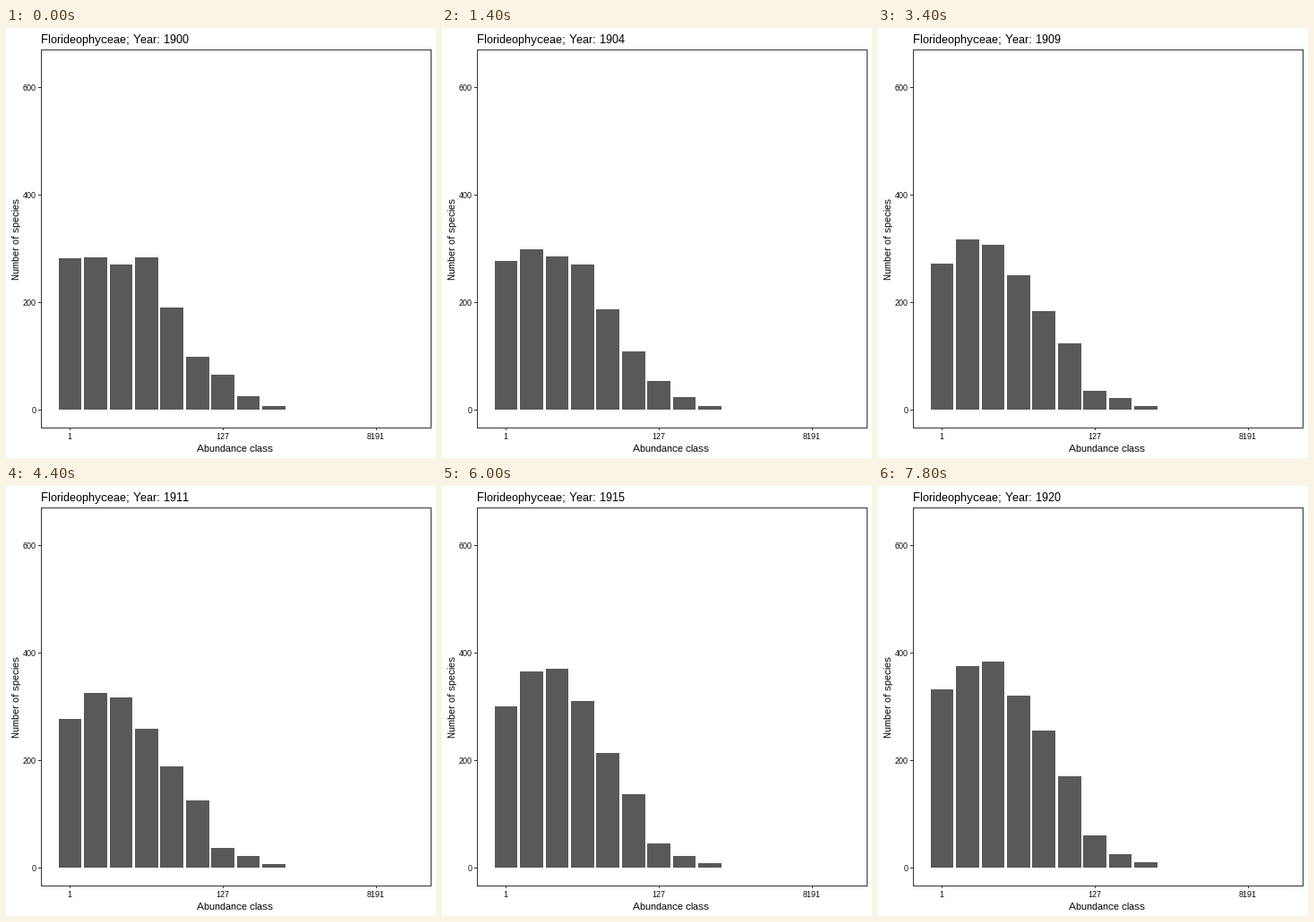
A matplotlib script for the animation above (8000 ms loop, 480 by 480 pixels).

```python
import numpy as np
import matplotlib.pyplot as plt
from matplotlib.animation import FuncAnimation
from matplotlib.patches import Rectangle

plt.rcParams.update({
    "font.family": ["Liberation Sans", "DejaVu Sans"],
    "text.hinting": "native",   # crisp, grid-fitted letters
    "text.hinting_factor": 1,
})

SIZE, DPI = 480, 80
FRAMES, STEP = 40, 200
YEARS_PER_FRAME = 50 / 99

BAR, LINE = "#595959", "#333333"
LEFT, RIGHT, TOP, BOTTOM = 39, 474, 24, 446
X0, PITCH, WIDTH = 58.65, 28.46, 25.6
ZERO, UNIT = 426.5, 0.6

# species per abundance class at the start, two turning points and the end
TURNS = [0, 17, 30, 39]
EASE = [1, 2, 1]
KEYS = np.array([
    [282, 285, 271, 284, 191, 99, 66, 26, 8],
    [273, 318, 308, 251, 184, 124, 36, 23, 8],
    [301, 366, 371, 311, 214, 138, 46, 23, 9],
    [333, 376, 384, 321, 256, 171, 61, 26, 11],
])

fig = plt.figure(figsize=(SIZE / DPI, SIZE / DPI), dpi=DPI, facecolor="white")
ax = fig.add_axes([0, 0, 1, 1])
ax.set(xlim=(0, SIZE), ylim=(SIZE, 0))
ax.axis("off")


def box(x, y, w, h, color):
    return ax.add_patch(Rectangle((x, y), w, h, fc=color, lw=0, antialiased=False))


def label(x, y, s, px, ha="center", **kw):
    return ax.text(x, y, s, fontsize=px * 72 / DPI, ha=ha, va="baseline",
                   color="black", **kw)


def y_px(count):
    return round(ZERO - UNIT * count)


def species(i):
    """Counts of all classes at step i."""
    k = min(np.searchsorted(TURNS, i, side="right"), len(TURNS) - 1) - 1
    t = (i - TURNS[k]) / (TURNS[k + 1] - TURNS[k])
    return KEYS[k] + (KEYS[k + 1] - KEYS[k]) * t ** EASE[k]


# panel border
for y in (TOP, BOTTOM):
    box(LEFT, y, RIGHT - LEFT + 1, 1, LINE)
for x in (LEFT, RIGHT):
    box(x, TOP, 1, BOTTOM - TOP + 1, LINE)

# axes: one x tick every six classes, at 2**n - 1
for k, n in enumerate((1, 7, 13)):
    x = 71 + 171 * k
    box(x, BOTTOM, 1, 3, LINE)
    label(x, 459, str(2 ** n - 1), 9)
for n in range(0, 601, 200):
    y = y_px(n)
    box(LEFT - 3, y, 3, 1, LINE)
    label(34, y + 4, str(n), 9, ha="right")
label(255.5, 473, "Abundance class", 11)
label(15, 235.5, "Number of species", 11, rotation=90, rotation_mode="anchor")
title = label(39, 17, "", 13, ha="left")

bars = []
for k in range(KEYS.shape[1]):
    a = X0 + PITCH * k
    left, right = round(a), round(a + WIDTH)
    bars.append(box(left, y_px(0), right - left, 0, BAR))


def draw(i):
    title.set_text(f"Florideophyceae; Year: {1900 + round(i * YEARS_PER_FRAME)}")
    for bar, count in zip(bars, species(i)):
        top = y_px(count)
        bar.set_y(top)
        bar.set_height(y_px(0) - top)
    return [title, *bars]


anim = FuncAnimation(fig, draw, frames=FRAMES, interval=STEP,
                     init_func=lambda: draw(0), repeat=True, repeat_delay=0)
plt.show()
```
